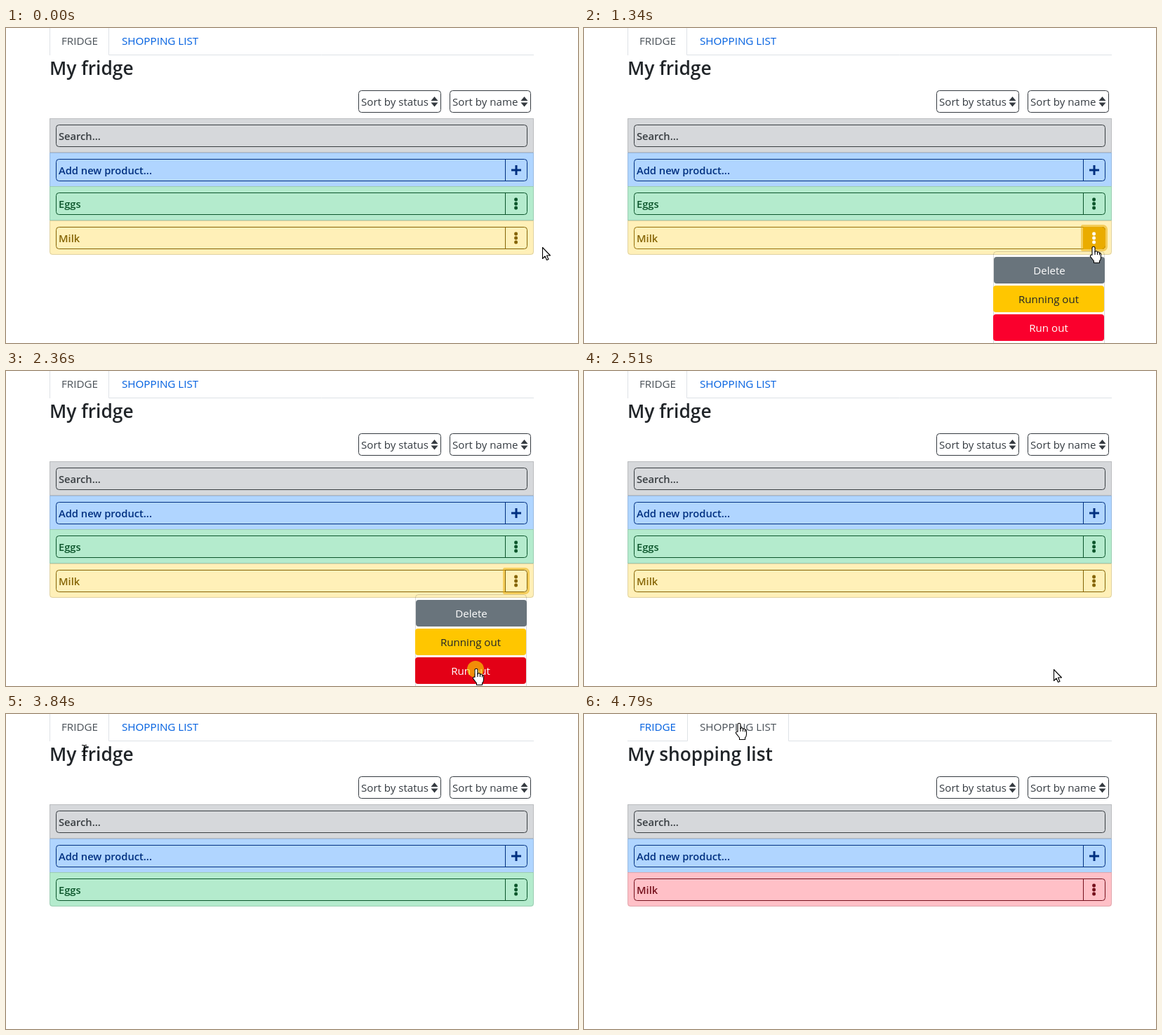
Write an HTML page with a canvas that moves like this. It is 815 px wide and 450 px high and loops after 6.19 s.

```html
<!DOCTYPE html>
<html lang="en">
<head>
<meta charset="utf-8">
<title>My fridge</title>
<style>
html, body { margin: 0; width: 100%; height: 100%; overflow: hidden; background: #fff; }
canvas { display: block; }
</style>
</head>
<body>
<canvas id="stage" width="815" height="450"></canvas>
<script>
const ctx = document.getElementById('stage').getContext('2d', { alpha: false });
const LOOP = 6190;
const DARK = '#343a40';
const LINK = '#0060e0';

// Pointer moves: path entries are [step, x, y].
const moves = [
  { start: 80, end: 650, steps: 8, path: [[0, 764, 313], [8, 733, 298]] },
  { start: 1340, end: 1880, steps: 8, path: [[0, 733, 298], [1, 725, 313], [8, 669, 426]] },
  { start: 3440, end: 3990, steps: 8, path: [[0, 669, 426], [6, 112, 52], [8, 85, 12]] },
  { start: 4080, end: 4460, steps: 6, path: [[0, 85, 12], [6, 220, 14]] }
];
const clicks = [[650, 800], [2360, 2510], [4630, 4790]];

const themes = {
  grey: { fill: '#d6d8db', ink: '#383d41' },
  blue: { fill: '#b0d5ff', ink: '#003080' },
  green: { fill: '#b4ebcd', ink: '#0b552b' },
  yellow: { fill: '#fff0b8', ink: '#856404' },
  red: { fill: '#ffc0c7', ink: '#75101c' }
};
const menuItems = [
  { label: 'Delete', x: 584, y: 327, fill: '#69747c', hover: '#59636a', ink: '#fff' },
  { label: 'Running out', x: 583, y: 368, fill: '#ffc600', hover: '#e6ae00', ink: '#212529' },
  { label: 'Run out', x: 583, y: 409, fill: '#fa002d', hover: '#e30016', ink: '#fff' }
];

const handShape = new Path2D('M-1 11.3V1.3a2 2 0 0 1 4 0V7a1.8 1.8 0 0 1 3.5.6a1.7 1.7 0 0 1 3 .9' +
  'a1.5 1.5 0 0 1 2 1.6V15q0 3-2 5v2.5H1.5V20L-3.6 13.4a1.8 1.8 0 0 1 2.6-2.1Z');
const handCreases = new Path2D('M3 6v5M6.5 7.5v3.5M9.5 8.5v3');
const arrowShape = new Path2D('M.5.5V16.5L4 13l2.5 5.5 2.5-1-2.5-5.5H11.5Z');
const beamShape = new Path2D('M-3.5-7.5H-1.5L0-6.5 1.5-7.5H3.5M0-6.5V6.5M-3.5 7.5H-1.5L0 6.5 1.5 7.5H3.5');

const within = (t, a, b) => t >= a && t < b;
const inside = (p, x, y, w, h) => within(p.x, x, x + w) && within(p.y, y, y + h);

function text(str, x, y, color, size = 15.1, weight = 400, align = 'left') {
  ctx.font = `${weight} ${size}px "Open Sans", "Noto Sans", sans-serif`;
  ctx.textAlign = align;
  ctx.fillStyle = color;
  ctx.fillText(str, x, y);
}

function box(x, y, w, h, radius, fill, stroke, width = 1) {
  ctx.beginPath();
  ctx.roundRect(x, y, w, h, radius);
  if (fill) { ctx.fillStyle = fill; ctx.fill(); }
  if (stroke) { ctx.strokeStyle = stroke; ctx.lineWidth = width; ctx.stroke(); }
}

function line(color, ...points) {
  ctx.beginPath();
  points.forEach(([x, y]) => ctx.lineTo(x, y));
  ctx.strokeStyle = color;
  ctx.lineWidth = 1;
  ctx.stroke();
}

function triangle(x, baseY, tipY) {
  ctx.beginPath();
  ctx.moveTo(x - 5, baseY);
  ctx.lineTo(x + 5, baseY);
  ctx.lineTo(x, tipY);
  ctx.fillStyle = DARK;
  ctx.fill();
}

function pointerAt(t) {
  let move = moves[0];
  for (const m of moves) if (t >= m.start) move = m;
  const gap = (move.end - move.start) / (move.steps - 1);
  const step = Math.max(0, Math.min(move.steps, Math.floor((t - move.start) / gap + 1e-6) + 1));
  const i = Math.max(1, move.path.findIndex(p => p[0] >= step));
  const [s0, x0, y0] = move.path[i - 1];
  const [s1, x1, y1] = move.path[i];
  const k = (step - s0) / (s1 - s0);
  const e = k * k * (3 - 2 * k);
  return { x: Math.round(x0 + (x1 - x0) * e), y: Math.round(y0 + (y1 - y0) * e) };
}

function drawTabs(shopping, pointer) {
  const border = '#dee2e6';
  const hovered = !shopping && inside(pointer, 147, 0, 145, 38);
  if (shopping) {
    line(border, [62, 38.5], [147.5, 38.5], [147.5, 0]);
    line(border, [291.5, 0], [291.5, 38.5], [752, 38.5]);
  } else {
    line(border, [62.5, 0], [62.5, 39]);
    line(border, [146.5, 0], [146.5, 38.5], [752, 38.5]);
    if (hovered) {
      line('#e9ecef', [147.5, 0], [147.5, 38]);
      line('#e9ecef', [291.5, 0], [291.5, 38]);
    }
  }
  text('FRIDGE', 79, 24, shopping ? LINK : '#495057', 15.2);
  text('SHOPPING LIST', 165, 24, shopping ? '#495057' : hovered ? '#0050a8' : LINK, 15.2);
}

function drawSort(label, x, w) {
  box(x + .5, 89.5, w - 1, 31, 4, '#fff', DARK);
  text(label, x + 4, 111, DARK);
  triangle(x + w - 9.5, 104, 98);
  triangle(x + w - 9.5, 106.5, 112.5);
}

function drawRow(index, label, theme, { icon, last, active } = {}) {
  const y = Math.round(129 + index * 48.67);
  const { fill, ink } = themes[theme];
  const low = last ? 4 : 0;
  box(62, y, 690, 49, [0, 0, low, low], fill);
  box(62.5, y + .5, 689, 48, [0, 0, low, low], null, 'rgba(0,0,0,.125)');
  if (active) box(711, y + 9, 32, 32, [0, 4, 4, 0], '#eaac00');
  box(71.5, y + 9.5, 671, 31, 4, null, active ? '#94700a' : ink);
  text(label, 75, y + 31, ink, 14.7, 600);
  if (!icon) return;
  if (active) box(711.5, y + 9.5, 31, 31, [0, 4, 4, 0], null, '#eaac00');
  else line(ink, [711.5, y + 9], [711.5, y + 41]);
  ctx.fillStyle = active ? '#fff' : ink;
  if (icon === 'plus') {
    ctx.fillRect(720, y + 23.5, 14, 3);
    ctx.fillRect(725.5, y + 18, 3, 14);
  } else {
    for (const dy of [19, 25, 31]) box(724.2, y + dy - 2.4, 4.8, 4.8, 2, ctx.fillStyle);
  }
}

function drawMenu(pointer, pressed) {
  box(583.5, 319.5, 158, 150, 4, null, 'rgba(0,0,0,.15)');
  for (const { label, x, y, fill, hover, ink } of menuItems) {
    const over = inside(pointer, x, y, 158, 38);
    box(x, y, 158, 38, 4, over ? hover : fill);
    if (over && pressed) box(x - 1.5, y - 1.5, 161, 41, 5, null, 'rgba(250,0,45,.5)', 3);
    text(label, x + 79, y + 25, ink, 15.1, 400, 'center');
  }
}

function drawPointer(pointer, kind) {
  ctx.save();
  ctx.translate(pointer.x, pointer.y);
  ctx.lineJoin = 'round';
  ctx.lineWidth = 1.1;
  ctx.strokeStyle = '#000';
  ctx.fillStyle = '#fff';
  if (kind === 'text') {
    ctx.translate(-.5, 0);
    ctx.stroke(beamShape);
  } else if (kind === 'hand') {
    ctx.fill(handShape);
    ctx.stroke(handShape);
    ctx.stroke(handCreases);
  } else {
    ctx.fill(arrowShape);
    ctx.stroke(arrowShape);
  }
  ctx.restore();
}

function draw(t) {
  const pointer = pointerAt(t);
  const shopping = t >= 4790;
  const menuOpen = within(t, 720, 2510);
  const hasMilk = t < 2740;
  const overMilk = hasMilk && inside(pointer, 711, 284, 32, 32);

  ctx.fillStyle = '#fff';
  ctx.fillRect(0, 0, 815, 450);
  drawTabs(shopping, pointer);
  text(shopping ? 'My shopping list' : 'My fridge', 62, 67, '#212529', 26.3, 600);
  drawSort('Sort by status', 502, 118);
  drawSort('Sort by name', 632, 116);

  drawRow(0, 'Search...', 'grey');
  drawRow(1, 'Add new product...', 'blue', { icon: 'plus' });
  if (shopping) drawRow(2, 'Milk', 'red', { icon: 'dots', last: true });
  else drawRow(2, 'Eggs', 'green', { icon: 'dots', last: !hasMilk });
  if (hasMilk) drawRow(3, 'Milk', 'yellow', { icon: 'dots', last: true, active: overMilk });
  if (within(t, 720, 2430)) box(709.5, 282.5, 35, 35, [1, 5, 5, 1], null, 'rgba(234,172,0,.5)', 3);
  if (menuOpen) drawMenu(pointer, t >= 2430);

  if (clicks.some(([a, b]) => within(t, a, b))) {
    ctx.beginPath();
    ctx.arc(pointer.x, pointer.y, 12, 0, Math.PI * 2);
    ctx.fillStyle = 'rgba(250,228,0,.62)';
    ctx.fill();
  }

  const overLink = overMilk || inside(pointer, 62, 0, 230, 38) ||
    inside(pointer, 711, 187, 32, 32) || inside(pointer, 711, 235, 32, 32) ||
    menuOpen && inside(pointer, 583, 319, 159, 131);
  const overText = inside(pointer, 62, 42, 123, 32) ||
    [138, 187, 235].some(y => inside(pointer, 71, y, 640, 32));
  drawPointer(pointer, overLink ? 'hand' : overText ? 'text' : 'arrow');
}

const begin = performance.now();
function tick() {
  draw((performance.now() - begin) % LOOP);
  requestAnimationFrame(tick);
}
tick();
</script>
</body>
</html>
```
